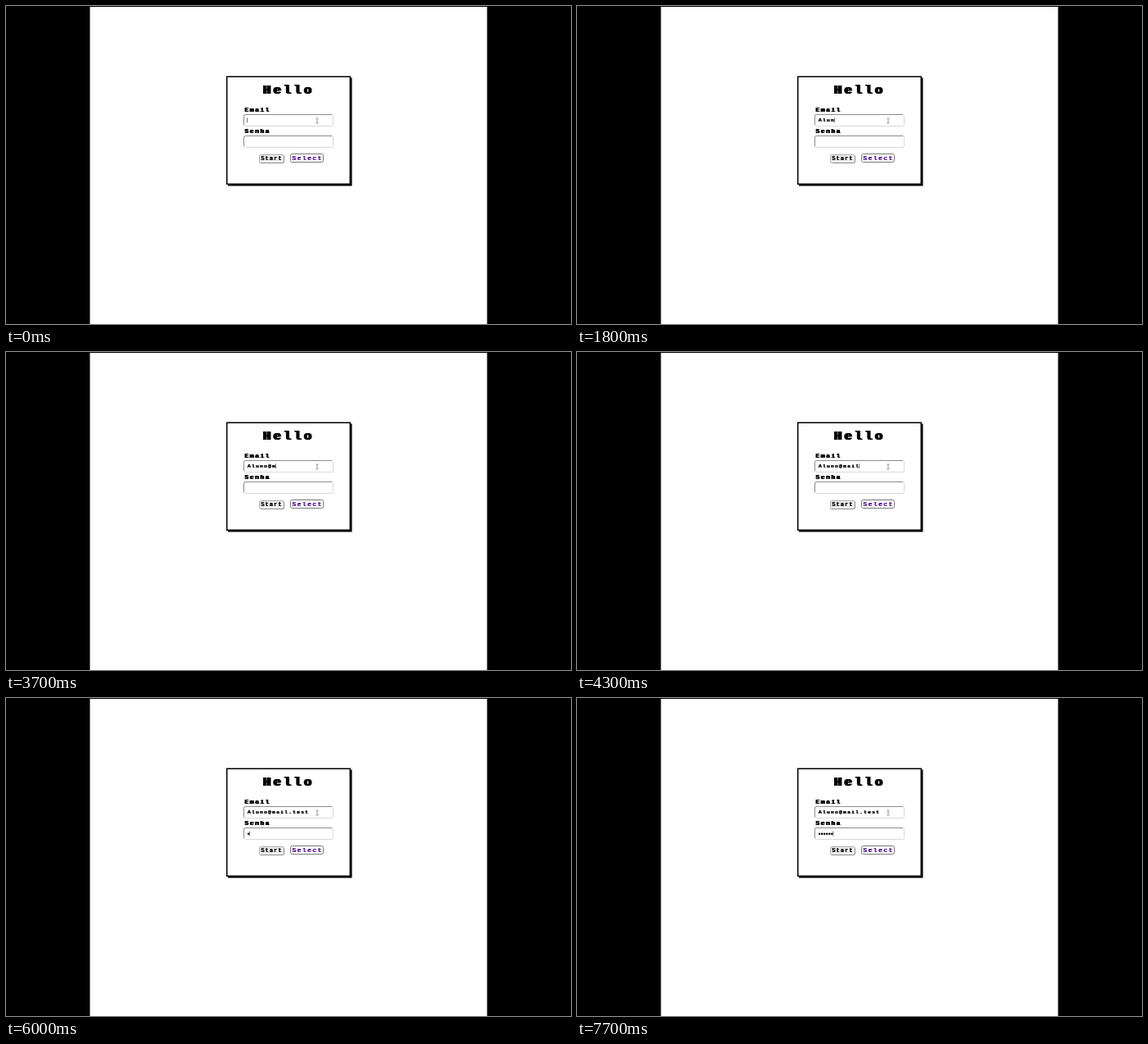
An HTML page that plays this animation: 690x388 px, repeating every 8000 ms.

```html
<!DOCTYPE html>
<html lang="pt">
<head>
<meta charset="utf-8">
<style>
  html, body { margin: 0; height: 100%; overflow: hidden; background: #000; }
  svg { display: block; width: 100%; height: 100%; }
  text {
    font: 6.2px "Liberation Mono", monospace;
    letter-spacing: .21em;
    text-shadow: .07em 0 currentColor, .14em 0 currentColor;
    white-space: pre;
  }
  .title { font-size: 15.4px; font-weight: bold; }
  .label { font-size: 7.8px; font-weight: bold; }
  .start { font-size: 6.5px; }
  .select { font-size: 7.7px; fill: #551a8b; color: #551a8b; }
  .dark, .light { fill: none; stroke: #8c8c8c; stroke-width: 1; }
  .light { stroke: #d8d8d8; }
</style>
</head>
<body>
<svg viewBox="0 0 690 388">
  <defs>
    <g id="field">
      <rect class="light" x=".5" y=".5" width="109" height="14" rx="2"/>
      <path class="dark" d="M.5 13V2.5Q.5 .5 2.5 .5H108"/>
    </g>
  </defs>
  <rect width="690" height="388"/>
  <rect x="102.5" y="1" width="485" height="387" fill="#fff"/>
  <rect x="271" y="87.5" width="151.5" height="132"/>
  <rect x="269.75" y="86.25" width="150.5" height="131" fill="#fff" stroke="#000" stroke-width="1.5"/>

  <text class="title" x="313" y="106.5">Hello</text>
  <text class="label" x="291" y="128.6">Email</text>
  <text class="label" x="291" y="154.8">Senha</text>
  <use href="#field" x="290" y="132"/>
  <use href="#field" x="290" y="158"/>

  <rect x="309.5" y="181.5" width="30" height="10" rx="2" fill="#efefef" stroke="#aaa"/>
  <path class="dark" d="M311 191.5H337.5Q339.5 191.5 339.5 189.5V183"/>
  <text class="start" x="311" y="188.3">Start</text>
  <rect x="347.5" y="180.5" width="40" height="10" rx="2" fill="#fff" stroke="#777"/>
  <text class="select" x="349" y="187.9">Select</text>

  <text id="mail" x="294.6" y="141.2"></text>
  <g id="dots"></g>
  <rect id="caret" width=".8" height="6" fill="#555"/>
  <path d="M378.3 137h1.2l.5.5.5-.5h1.2M380 137.5V142.5M378.3 143h1.2l.5-.5.5.5h1.2" fill="none" stroke="#777" stroke-width=".8"/>
</svg>
<script>
const LOOP = 8000;
const ADDRESS = "Aluno@mail.test";
// Key press times in ms
const mailKeys = [900, 1400, 1600, 1800, 1900, 3100, 3600, 4000, 4100, 4300, 4500, 4800, 5000, 5200, 5300];
const passKeys = [6000, 6200, 6400, 6600, 6600, 6700];
const caretOff = [[500, 900], [2100, 2700], [5300, 5600], [7200, 7700]];
const passFocus = 5600;

const [mail, dots, caret] = ["mail", "dots", "caret"].map(id => document.getElementById(id));
const typed = (keys, t) => keys.filter(k => k <= t).length;

for (let i = 0; i < passKeys.length; i++) {
  const dot = document.createElementNS("http://www.w3.org/2000/svg", "circle");
  dot.setAttribute("cx", 296.1 + 3.05 * i);
  dot.setAttribute("cy", 165.8);
  dot.setAttribute("r", 1.25);
  dots.append(dot);
}

function draw(now) {
  const t = now % LOOP;
  const chars = typed(mailKeys, t), hidden = typed(passKeys, t);
  const inPass = t >= passFocus;
  mail.textContent = ADDRESS.slice(0, chars);
  [...dots.children].forEach((dot, i) => dot.setAttribute("visibility", i < hidden ? "visible" : "hidden"));
  caret.setAttribute("x", inPass ? 294.2 + 3.05 * hidden : 294 + 5.03 * chars);
  caret.setAttribute("y", inPass ? 162.5 : 136.3);
  caret.setAttribute("visibility", caretOff.some(([a, b]) => t >= a && t < b) ? "hidden" : "visible");
}

const begin = performance.now();
function tick() {
  draw(performance.now() - begin);
  requestAnimationFrame(tick);
}
tick();
</script>
</body>
</html>
```
